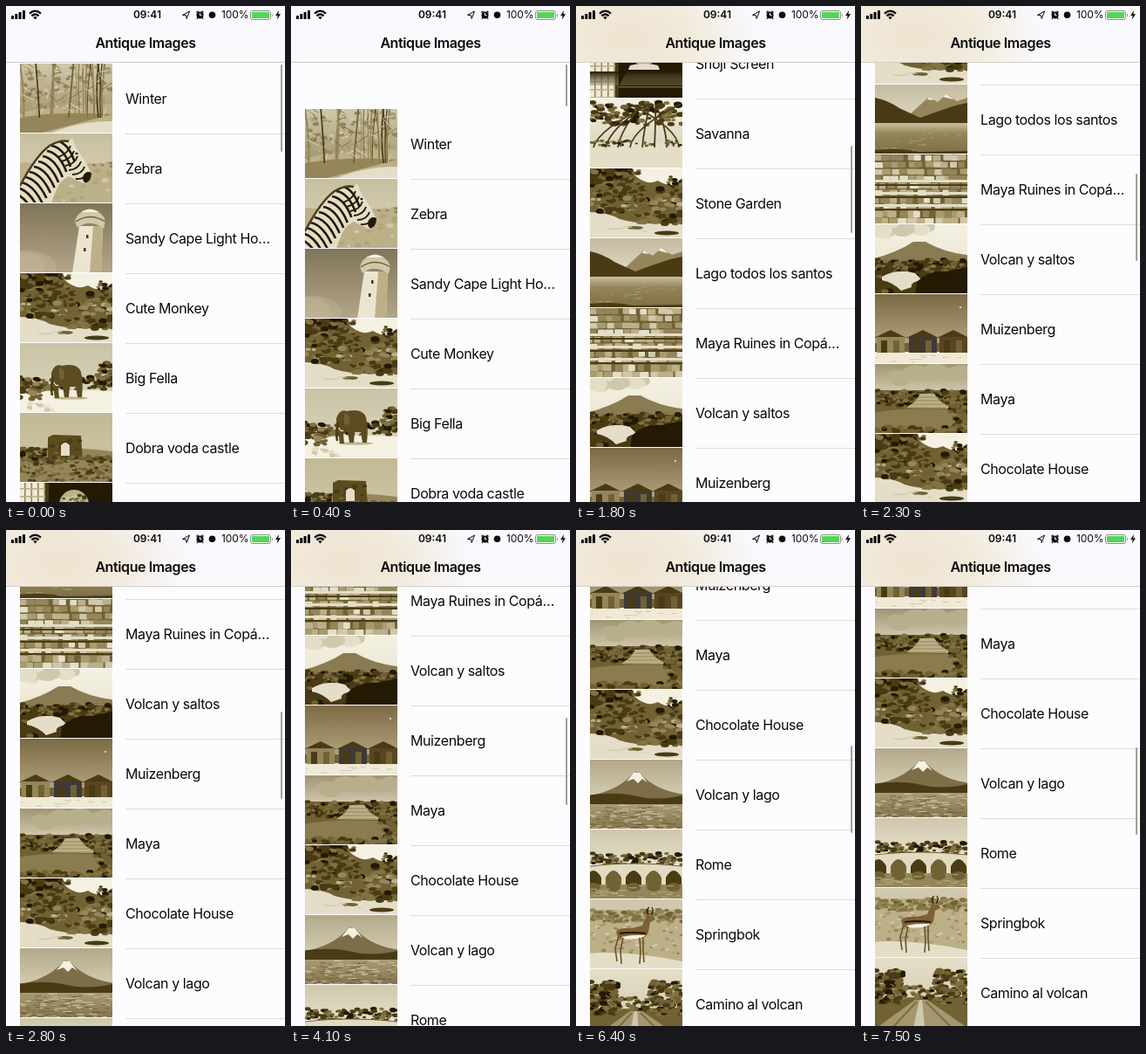
Recreate the animation shown at these times as an HTML page. Size 320x568 px, loop 7.6 s.

```html
<!DOCTYPE html>
<html lang="en">
<head>
<meta charset="utf-8">
<title>Photo list</title>
<style>
html, body { margin: 0; width: 100%; height: 100%; overflow: hidden; background: #fcfcfe; }
#stage { position: relative; width: 320px; height: 568px; overflow: hidden; color: #0a0a08;
  font-family: Inter, Roboto, "Liberation Sans", sans-serif; }
#list { position: absolute; left: 0; top: 66px; width: 320px; }
.row { position: relative; height: 80px; }
.row svg { position: absolute; left: 16px; top: 0; }
.row span { position: absolute; left: 137px; top: 0; font-size: 16px; line-height: 80px;
  letter-spacing: -.4px; white-space: nowrap; }
.row::after { content: ""; position: absolute; left: 137px; right: 0; bottom: -1px; height: 1px; background: #deddd0; }
.soft { filter: blur(.7px); }
#nav { position: absolute; left: 0; top: 0; width: 320px; height: 64px; background: #f9f9fd;
  border-bottom: 1px solid #d0cfc4; }
#tint { position: absolute; inset: 0; background:
  radial-gradient(ellipse 150px 90px at 60px 36px, #eee3d0 0%, #f1e9da 45%, #f9f9fd00 100%); }
#nav svg { position: absolute; left: 0; top: 0; }
#title { position: absolute; left: 0; width: 320px; top: 30px; text-align: center;
  font-weight: 600; font-size: 16px; line-height: 24px; letter-spacing: -.4px; }
#thumb { position: absolute; left: 314.5px; top: 67px; width: 2.5px; border-radius: 2px; background: #a09f98; }
</style>
</head>
<body>
<div id="stage">
  <div id="list"></div>
  <div id="thumb"></div>
  <div id="nav">
    <div id="tint"></div>
    <svg width="320" height="24" fill="#0a0a08" font-family="Inter, Roboto, sans-serif" font-size="12">
      <rect x="6" y="11" width="3" height="4" rx=".6"/>
      <rect x="10.3" y="9" width="3" height="6" rx=".6"/>
      <rect x="14.6" y="7" width="3" height="8" rx=".6"/>
      <rect x="19" y="5" width="3" height="10" rx=".6"/>
      <path d="M27 8.6Q33.5 2.6 40 8.6M29.4 11.4Q33.5 7.6 37.6 11.4" fill="none" stroke="#0a0a08" stroke-width="2.2"/>
      <path d="M31.3 13Q33.5 11 35.7 13L33.5 15.4Z"/>
      <text x="162" y="14.4" text-anchor="middle" font-weight="600">09:41</text>
      <path d="M202.5 10.4L210.5 6L207.2 14.5L206.5 10.8Z" fill="none" stroke="#0a0a08"/>
      <circle cx="222.500" cy="10.6" r="4"/>
      <path d="M218.5 7.5L220.5 5.7M226.5 7.5L224.5 5.7M219.8 13.5L218.8 15M225.2 13.5L226.2 15" stroke="#0a0a08" stroke-width="1.3"/>
      <path d="M222.5 8V10.8H224.7" fill="none" stroke="#fff"/>
      <circle cx="236.5" cy="10.3" r="3.8"/>
      <text x="247" y="14.4" letter-spacing="-.1">100%</text>
      <rect x="280.5" y="5.5" width="23" height="10" rx="2.5" fill="none" stroke="#8d8d84"/>
      <rect x="282" y="7" width="20" height="7" rx="1" fill="#52d556"/>
      <path d="M305 8.5Q307 10.5 305 12.5Z" fill="#8d8d84"/>
      <path d="M313 5L309 11H311.6L310.8 15.5L315 9.3H312.3Z"/>
    </svg>
    <div id="title">Antique Images</div>
  </div>
</div>
<script>
// Sepia tones, light to dark
const PALE = '#f5f1e2', CREAM = '#e4dec8', SKY = '#cfc8ac', SAND = '#bbb088', MID = '#94865a',
      OLIVE = '#716234', DARK = '#493b14', DEEP = '#231a04';
const FOLIAGE = [OLIVE, OLIVE, DARK, DARK, DEEP, '#827344'];

const rect = (x, y, w, h, c) => `<rect x="${x}" y="${y}" width="${w}" height="${h}" fill="${c}"/>`;
const oval = (x, y, rx, ry, c) => `<ellipse cx="${x}" cy="${y}" rx="${rx}" ry="${ry}" fill="${c}"/>`;
const path = (d, c) => `<path d="${d}" fill="${c}"/>`;
const line = (d, c, w = 1) => `<path d="${d}" fill="none" stroke="${c}" stroke-width="${w}"/>`;
const times = (n, f) => Array.from({ length: n }, (_, i) => f(i)).join('');
const soft = parts => `<g class="soft">${parts}</g>`;

let seed = 1, ids = 0;
const next = () => (seed = seed * 16807 % 2147483647) / 2147483647;
const rnd = (a, b) => +(a + (b - a) * next()).toFixed(1);
const pick = list => list[Math.floor(next() * list.length)];

// Vertical gradient band
function fade(top, bottom, y = 0, h = 80) {
  const id = 'g' + ids++;
  return `<linearGradient id="${id}" x2="0" y2="1"><stop stop-color="${top}"/>` +
    `<stop offset="1" stop-color="${bottom}"/></linearGradient>` + rect(0, y, 106, h, `url(#${id})`);
}

// Soft clumps scattered in a box
const leaves = (n, x, y, w, h, size, colors = FOLIAGE) => soft(times(n, () => {
  const r = rnd(size * .5, size);
  return oval(rnd(x, x + w), rnd(y, y + h), r, +(r * .6).toFixed(1), pick(colors));
}));

const ripples = (n, y, h, c) => soft(times(n, () => line(`M${rnd(-4, 100)} ${rnd(y, y + h)}h${rnd(3, 10)}`, c, .9)));

const scenes = {
  winter: () => fade(SKY, MID) + leaves(90, 0, 2, 106, 50, 4, [SAND, SKY, MID, '#a89b70']) +
    path('M0 56Q40 48 106 46V80H0Z', SAND) + path('M0 62Q40 54 106 58L60 70Q30 78 20 80H0Z', MID) +
    path('M34 80Q66 66 106 66V80Z', CREAM) + soft(
    times(16, () => { const x = rnd(0, 100); return line(`M${x} 62Q${x + rnd(-4, 4)} 30 ${x + rnd(-5, 6)} 0`, pick([DARK, OLIVE, MID]), rnd(.7, 2.4)); }) +
    times(50, () => line(`M${rnd(0, 100)} ${rnd(4, 62)}l${rnd(-14, 14)} ${rnd(-10, -2)}`, pick([CREAM, OLIVE, MID]), .8))),

  zebra() {
    const body = 'M0 62C8 44 20 24 34 14Q46 7 56 9L60 5L63 14L68 22Q77 34 82 46Q82 56 73 57Q64 53 56 49Q47 53 43 62Q38 72 36 80H0Z';
    return fade('#c6bf9f', SKY, 0, 34) + rect(0, 34, 106, 46, SAND) + leaves(30, 0, 33, 106, 5, 4, [MID, SAND]) +
      leaves(40, 40, 42, 66, 38, 4, [SKY, SAND, '#b0a47a']) +
      `<clipPath id="zebra"><path d="${body}"/></clipPath>` + path(body, CREAM) + '<g clip-path="url(#zebra)">' +
      times(12, i => line(`M${i * 5 - 14} ${74 - i * 6}q14 2 ${26 - i * .4} 24`, DEEP, 2.7)) +
      times(6, i => line(`M${58 + i * 4} ${14 + i * 6}q-3 9 -14 ${13 - i}`, DEEP, 1.9)) +
      oval(79, 51, 7, 7, DEEP) + '</g>' + line('M0 60C9 43 20 24 34 14Q46 7 56 9', DARK, 2.4) + oval(65, 23, 1.6, 1.3, DEEP);
  },

  lighthouse: () => fade('#80745a', '#b3a68a') + leaves(2, -10, 70, 30, 8, 50, ['#c9bd9c55']) +
    path('M68 26H95L93 80H60Z', '#ebe5d0') + path('M84 26H95L93 80H80Z', SAND) +
    path('M63 21Q66 8 80 8Q94 8 98 20L96 29Q80 17 66 28Z', SKY) + line('M64 21Q80 10 98 21', OLIVE, 1.3) +
    path('M70 10Q80 3 91 10Z', PALE) + rect(76, 36, 2.5, 4, DARK) + rect(73, 51, 2.5, 4, DARK),

  garden: () => rect(0, 0, 106, 80, OLIVE) + path('M44 0H106V17Q90 22 78 14Q62 22 44 0Z', PALE) +
    leaves(70, 0, 0, 46, 24, 6) + leaves(14, 46, 2, 12, 16, 4) + leaves(16, 88, 8, 20, 14, 4) +
    leaves(90, 0, 22, 106, 24, 6) + leaves(50, 0, 32, 106, 18, 5, [MID, OLIVE, SAND, DARK]) +
    soft(path('M0 50Q20 50 34 58Q60 66 106 62V84H0Z', CREAM)) + leaves(30, 48, 50, 60, 13, 6) +
    leaves(12, 8, 46, 30, 6, 5) + oval(52, 68, 9, 2, OLIVE) + oval(88, 74, 14, 2.5, DARK) + ripples(8, 66, 10, SKY),

  elephant: () => fade('#c9c3a6', '#dcd6be') + leaves(80, -4, 39, 114, 14, 5) + leaves(40, 88, 22, 20, 28, 5) +
    path('M0 58Q50 52 106 55V80H0Z', PALE) + leaves(40, -6, 46, 32, 18, 5, [OLIVE, DARK, MID]) +
    leaves(10, 0, 68, 40, 10, 4, [SKY, CREAM]) + oval(58, 63, 20, 1.6, SAND) +
    soft(path('M36 34Q40 23 48 26Q66 22 70 33Q73 44 71 62H66L64 50H57L56 62H51L49 50L44 52L45 63H40L38 50Q36 40 36 34Z', '#5c4c22') +
    path('M45 28Q52 29 51 40Q47 45 45 39Z', OLIVE) + line('M38 38Q35 50 37 60', DARK, 2.6)) + line('M39 45Q41 50 44 48', PALE, 1.2),

  castle: () => fade('#c2b994', SKY) + path('M0 42Q40 36 106 44V80H0Z', MID) +
    soft(path('M32 54L32 28L38 25L70 26L72 54Z', '#5c4b1e') + leaves(20, 35, 29, 34, 20, 4, [OLIVE, DARK, '#5c4b1e']) +
    path('M47 49V37Q52 31 57 37V49Z', CREAM)) + leaves(60, 0, 50, 106, 6, 4, [DARK, OLIVE]) +
    leaves(170, 0, 54, 106, 26, 3.5, [OLIVE, MID, '#827344', DARK]) + leaves(40, 0, 40, 30, 14, 4),

  shoji: () => rect(0, 0, 106, 80, DEEP) + rect(0, 0, 30, 80, '#efe9d4') +
    times(4, i => rect(i * 7.5 + 5, 0, 1.6, 80, MID)) + times(9, i => rect(0, i * 9 + 6, 29, 1.6, SAND)) +
    rect(29, 0, 4, 80, DARK) + oval(62, 25, 17, 17, SAND) + leaves(60, 49, 14, 26, 24, 3, [OLIVE, MID, SKY, DARK]) +
    path('M46 42Q62 38 78 42L80 47H44Z', CREAM) + fade('#231a04', '#8d7f5a66', 49, 16) + path('M33 49H42L33 66Z', DEEP) + rect(33, 66, 73, 1.5, OLIVE),

  trees: () => fade(PALE, SKY) + leaves(110, 0, 4, 106, 26, 5) + path('M0 54Q50 46 106 52V80H0Z', CREAM) + soft(
    times(8, i => line(`M${4 + i * 14} 56Q${10 + i * 13} 34 ${rnd(0, 106)} 6`, DARK, 1.8))) + leaves(40, 0, 48, 106, 6, 3),

  lago: () => fade('#c4baa0', '#e3dcc8', 0, 46) + path('M40 34L62 14L72 20L82 11L94 19L106 15V45H40Z', MID) +
    path('M60 17L62 14L68 18ZM78 14L82 11L90 17Z', PALE) +
    soft(path('M-4 14Q16 18 28 27L52 38L74 30L92 24L110 20V45H-4Z', DARK)) +
    fade('#cabf9f', MID, 44, 12) + fade(MID, '#7c6d42', 56, 24) + ripples(20, 46, 30, '#a99c74') + path('M0 75Q30 72 50 77L106 76V80H0Z', DARK),

  stones: () => rect(0, 0, 106, 80, OLIVE) + soft(times(10, r => times(12, i => {
    const big = r > 5;
    return `<rect x="${i * 10 - rnd(0, 6)}" y="${r * 8 + rnd(0, 1)}" width="${rnd(7, 12)}" height="${big ? 7.5 : 6.5}" rx="1" fill="${pick([SKY, SAND, CREAM, MID, SAND, '#a89b70'])}"/>`;
  })) + times(3, i => rect(0, 34 + i * 14, 106, 2, DARK) + rect(0, 29 + i * 14, 106, 3, CREAM))),

  falls: () => fade(PALE, CREAM) + leaves(12, 0, 2, 60, 10, 14, [SKY, CREAM]) +
    soft(path('M-4 40Q26 32 44 20H58Q78 32 110 36V58H-4Z', '#8a7b52')) +
    rect(0, 42, 106, 38, DARK) + leaves(110, 0, 40, 106, 14, 4) + leaves(40, 0, 52, 106, 28, 6, [DARK, DEEP, OLIVE]) +
    soft(path('M8 60Q26 50 46 56L54 64Q40 66 42 72L30 76Q20 66 8 64Z', CREAM) + path('M48 66Q62 52 82 54L110 48V84H46Z', DEEP)),

  huts: () => fade('#7b6a44', '#b5a682', 0, 62) + oval(98, 15, 1, 1, PALE) +
    rect(0, 66, 106, 14, '#efe9d6') + rect(0, 56, 106, 10, OLIVE) + [2, 39, 74].map((x, i) =>
      path(`M${x - 3} 50L${x + 16} 41L${x + 34} 50Z`, DARK) + rect(x, 49, 32, 18, [MID, '#3f3a38', '#5a4422'][i]) +
      rect(x + 5, 53, 7, 14, DARK) + rect(x + 19, 53, 7, 14, OLIVE)).join('') + ripples(10, 69, 9, SKY),

  temple: () => fade('#a09572', '#d0c8ae', 0, 32) + leaves(8, 10, 6, 90, 14, 16, ['#b9ae8c']) + rect(0, 30, 106, 50, OLIVE) + leaves(120, 0, 30, 106, 18, 4) +
    soft(path('M36 50L46 43L52 34H68L74 42L88 51Z', SAND) + times(4, i => line(`M${49 - i * 3} ${38 + i * 4}H${73 + i * 3}`, MID))) +
    soft(path('M-4 56Q40 48 110 54V72Q50 80 -4 72Z', '#8a7c4e')) + leaves(50, 0, 72, 106, 8, 5) + leaves(36, 86, 46, 20, 28, 5),

  volcano: () => fade('#b3a889', '#d6cfb6', 0, 46) + soft(path('M-4 42Q32 36 49 16Q53 13 58 16Q76 36 110 40V50H-4Z', '#7d6e48')) +
    path('M42 25Q47 19 50 15H57L66 26L60 22L55 27L50 22Z', PALE) + soft(path('M-4 41Q30 36 54 42T110 40V52H-4Z', DARK)) +
    fade('#a99c74', '#82744c', 51, 29) + ripples(70, 52, 27, SKY) + ripples(50, 54, 25, OLIVE),

  bridge: () => fade(SKY, CREAM, 0, 40) + leaves(100, 0, 27, 106, 14, 4) + rect(0, 50, 106, 30, OLIVE) +
    path('M0 42Q50 36 106 42V63H0Z', '#e2dbc2') + line('M0 42Q50 36 106 42', OLIVE, 1.2) +
    times(5, i => path(`M${i * 23 - 5} 64V55Q${i * 23 + 4} 39 ${i * 23 + 13} 55V64Z`, i % 2 ? OLIVE : DARK)) +
    rect(0, 63, 106, 17, MID) + soft(times(5, i => oval(i * 23 + 4, 66, 8, 5, OLIVE))) + ripples(24, 64, 14, SAND),

  antelope: () => rect(0, 0, 106, 80, SAND) + rect(0, 0, 106, 12, SKY) + leaves(110, 0, 12, 106, 14, 4, [OLIVE, MID, '#827344']) +
    leaves(90, 0, 28, 106, 34, 3, ['#a99c70', SKY, MID, SAND]) + soft(path('M-4 62Q44 58 110 72V84H-4Z', CREAM)) +
    path('M30 37Q34 32 48 33L60 30L65 18L73 19L75 23L69 26L67 38Q64 45 56 45L38 45Q32 46 30 37Z', '#7d6034') +
    path('M36 43Q50 40 64 41Q58 47 38 45Z', PALE) + line('M34 39Q48 37 64 39', DEEP, 2) +
    line('M33 42L29 56L31 71M38 44L35 58L36 74M57 44L58 60L57 74M61 43L61 58L62 72', '#6b5228', 1.6) +
    line('M67 18Q64 11 68 9M70 18Q74 13 71 9', DEEP, 1.2),

  road: () => fade(CREAM, SKY) + path('M0 46L106 44V80H0Z', OLIVE) + leaves(110, 0, 14, 32, 38, 5) + leaves(100, 68, 14, 38, 38, 5) +
    leaves(50, 26, 32, 50, 16, 4) + soft(path('M46 48H60L106 80H2Z', '#a4976f') + path('M51 48H54L57 80H44Z', SKY) +
    line('M48 50L20 80M58 50L88 80', '#7c6d42', 2))
};

const rows = [
  ['Winter', 'winter'], ['Zebra', 'zebra'], ['Sandy Cape Light Ho…', 'lighthouse'], ['Cute Monkey', 'garden'],
  ['Big Fella', 'elephant'], ['Dobra voda castle', 'castle'], ['Shoji Screen', 'shoji'], ['Savanna', 'trees'],
  ['Stone Garden', 'garden'], ['Lago todos los santos', 'lago'], ['Maya Ruines in Copá…', 'stones'],
  ['Volcan y saltos', 'falls'], ['Muizenberg', 'huts'], ['Maya', 'temple'], ['Chocolate House', 'garden'],
  ['Volcan y lago', 'volcano'], ['Rome', 'bridge'], ['Springbok', 'antelope'], ['Camino al volcan', 'road']
];
const byId = id => document.getElementById(id);
const list = byId('list'), thumb = byId('thumb'), tint = byId('tint');
list.innerHTML = rows.map(([name, scene]) => {
  seed = 4177;
  return `<div class="row"><svg width="106" height="79" viewBox="0 0 106 79">${scenes[scene]()}</svg><span>${name}</span></div>`;
}).join('');

// [time in ms, scroll offset in px]
const LOOP = 7600, STEP = 100;
const keys = [[0, 0], [100, -8], [400, -52], [500, -56], [700, -24], [800, 0], [900, 38], [1000, 89],
  [1200, 200], [1500, 365], [1800, 520], [2100, 640], [2300, 696], [2600, 758], [2900, 802], [3200, 825],
  [5600, 825], [5700, 850], [5800, 915], [5900, 957], [6100, 983], [6400, 1003], [6800, 1013], [7100, 1016], [LOOP, 1016]];

function offsetAt(t) {
  const i = keys.findIndex(k => k[0] > t);
  const [t0, s0] = keys[i - 1], [t1, s1] = keys[i];
  return Math.round(s0 + (s1 - s0) * (t - t0) / (t1 - t0));
}

function draw(now) {
  const s = offsetAt(Math.floor(Math.max(now, 0) % LOOP / STEP) * STEP);
  list.style.transform = `translateY(${-s}px)`;
  thumb.style.height = 100 + Math.min(s, 0) + 'px';
  thumb.style.transform = `translateY(${Math.round(Math.max(s, 0) * .179)}px)`;
  tint.style.opacity = Math.min(Math.max(s / 60, 0), 1);
  requestAnimationFrame(draw);
}
draw(performance.now());
</script>
</body>
</html>
```
